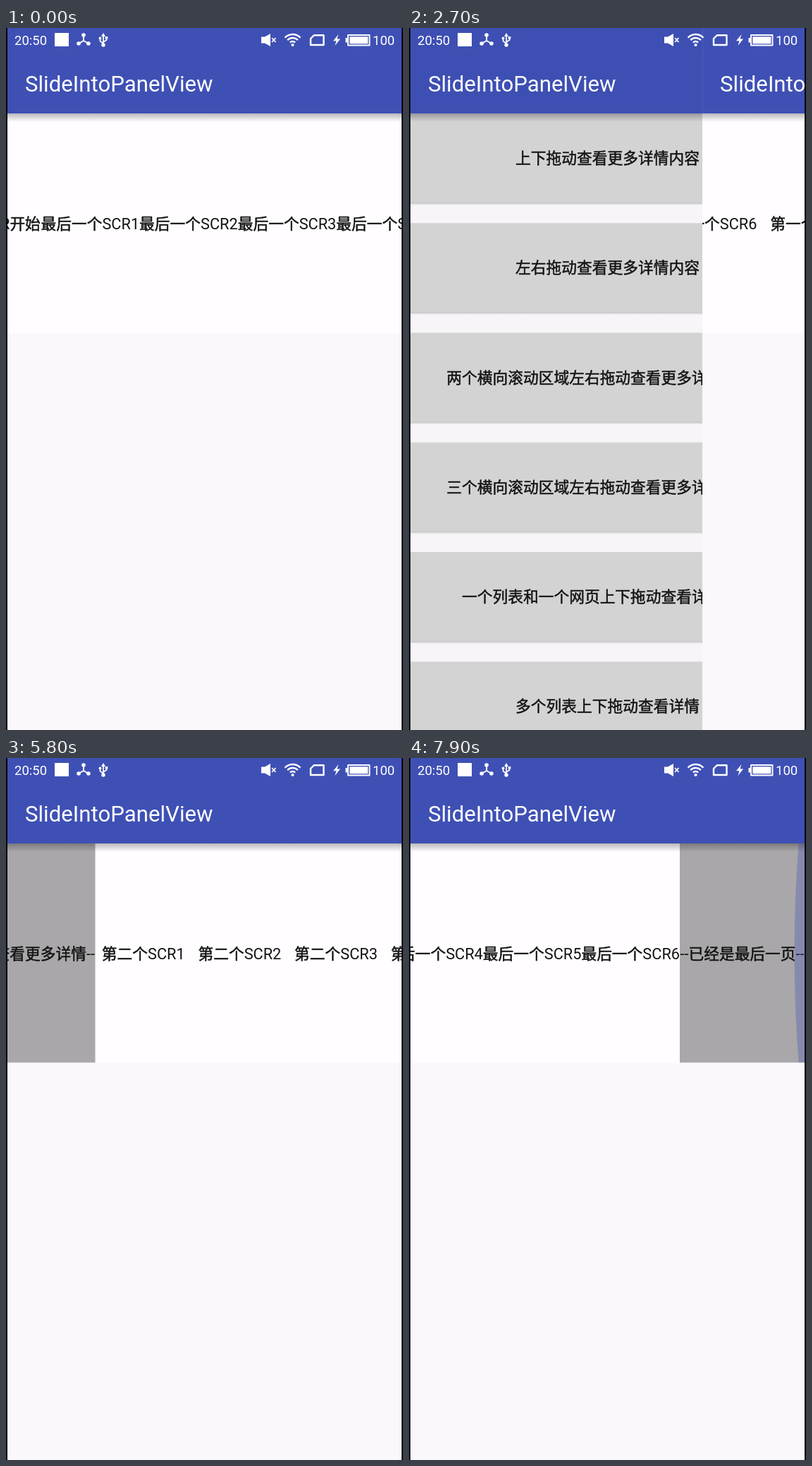
Animation, 563 px wide and 994 px high, one loop 8 s. Source, as an HTML page with a canvas:

```html
<!DOCTYPE html>
<html lang="zh-CN">
<head>
<meta charset="utf-8">
<style>
html, body { margin: 0; width: 100%; height: 100%; overflow: hidden; background: #000; }
canvas { display: block; }
</style>
</head>
<body>
<canvas id="stage" width="563" height="994"></canvas>
<script>
const ctx = document.getElementById('stage').getContext('2d');
const FONT = 'Roboto, "Noto Sans CJK SC", "Noto Sans CJK", sans-serif';
const BLUE = '#3f50b5', INK = '#141414', WHITE = '#fff';
const LOOP = 8000, STEP = 100, W = 559, H = 994, BAR = 121, STRIP = 310.6, SIZE = 21.74;

// Strip geometry: three sections, each closed by a grey panel
const ITEM = 136.6, PANEL = 199, LAST_PANEL = 177, LAST_ITEM = 139.6, LEAD = 171.5;
const SECOND = 8 * ITEM + PANEL, THIRD = 2 * SECOND;
const LAST = THIRD + LEAD + 6 * LAST_ITEM;
const END1 = SECOND - W, END2 = THIRD - W, END3 = LAST + LAST_PANEL - W;
const REOPEN = 3000;

// Each swipe eases on from where the previous one stopped; an edge that is hit glows
const swipes = [
  { from: -1, to: 300, x: THIRD, edge: 'left' },
  { from: 400, to: 1000, x: END2 },
  { from: 1000, to: 1300, x: SECOND, edge: 'left' },
  { from: 1400, to: 1800, x: END1 },
  { from: REOPEN - 1, to: REOPEN, x: 0 },
  { from: 4200, to: 4700, x: END1, edge: 'right' },
  { from: 5345, to: 6000, x: SECOND },
  { from: 6100, to: 6600, x: END2, edge: 'right' },
  { from: 6829, to: 7200, x: THIRD },
  { from: 7500, to: 7850, x: END3, edge: 'right' }
];

const progress = (t, from, to) => Math.min(1, Math.max(0, (t - from) / (to - from)));
const smooth = p => p * p * (3 - 2 * p);

function scrollAt(t) {
  return swipes.reduce((x, s) => x + (s.x - x) * smooth(progress(t, s.from, s.to)), THIRD + 124);
}

function pageAt(t) {
  return t < REOPEN
    ? W * smooth(progress(t, 2500, 2800))
    : W * (1 - progress(t, 3600, 3900)) ** 4.7;
}

function rect(color, x, y, w, h) {
  ctx.fillStyle = color;
  ctx.fillRect(x, y, w, h);
}

// Chinese runs get a thin outline to look heavier than the Latin ones
function text(str, x, y, size = SIZE, color = INK, centered = false) {
  ctx.font = `${size}px ${FONT}`;
  ctx.fillStyle = ctx.strokeStyle = color;
  ctx.lineWidth = 0.5;
  if (centered) x -= ctx.measureText(str).width / 2;
  for (const run of str.match(/[\u4e00-\u9fff]+|[^\u4e00-\u9fff]+/g)) {
    ctx.fillText(run, x, y);
    if (run >= '\u4e00') ctx.strokeText(run, x, y);
    x += ctx.measureText(run).width;
  }
}

function clipped(x, y, w, h, draw) {
  ctx.save();
  ctx.beginPath();
  ctx.rect(x, y, w, h);
  ctx.clip();
  draw();
  ctx.restore();
}

function fade(y, h, alpha) {
  const g = ctx.createLinearGradient(0, y, 0, y + h);
  g.addColorStop(0, `rgba(0,0,0,${alpha})`);
  g.addColorStop(1, 'rgba(0,0,0,0)');
  rect(g, 0, y, W, h);
}

function appBar() {
  rect(BLUE, 0, 0, W, BAR);
  fade(BAR, 12, 0.27);
  text('SlideIntoPanelView', 25, 90, 31.2, WHITE);
}

function panel(str, x, w) {
  rect('#a9a7a9', x, BAR, w, STRIP);
  text(str, x + w / 2, 285, SIZE, INK, true);
}

function strip(scroll) {
  ctx.save();
  ctx.translate(-scroll, 0);
  ['第一个', '第二个'].forEach((name, s) => {
    const x = s * SECOND;
    for (let i = 0; i < 8; i++) text(`${name}SCR${i + 1}`, x + i * ITEM + 9.3, 285);
    panel('--左拉查看更多详情--', x + 8 * ITEM, PANEL);
  });
  text('最后一个SCR开始', THIRD, 285);
  for (let i = 0; i < 6; i++) text(`最后一个SCR${i + 1}`, THIRD + LEAD + i * LAST_ITEM, 285);
  panel('--已经是最后一页--', LAST, LAST_PANEL);
  ctx.restore();
}

function glow({ to, edge }, t) {
  const depth = 16 * Math.sin(Math.PI * progress(t, to - 130, to + 370));
  if (!edge || depth < 0.1) return;
  ctx.save();
  if (edge === 'right') {
    ctx.translate(W, 0);
    ctx.scale(-1, 1);
  }
  ctx.fillStyle = `rgba(63,81,181,${depth * 0.023})`;
  ctx.beginPath();
  ctx.moveTo(0, BAR);
  ctx.lineTo(depth * 0.58, BAR);
  ctx.quadraticCurveTo(depth * 1.42, BAR + STRIP / 2, depth * 0.58, BAR + STRIP);
  ctx.lineTo(0, BAR + STRIP);
  ctx.fill();
  ctx.restore();
}

function detailPage(t) {
  rect('#faf8fb', 0, 0, W, H);
  rect('#fffdff', 0, BAR, W, STRIP);
  clipped(0, BAR, W, STRIP, () => {
    strip(scrollAt(t));
    swipes.forEach(s => glow(s, t));
  });
  appBar();
}

function menuPage(t, dim) {
  const rows = [
    '上下拖动查看更多详情内容', '左右拖动查看更多详情内容',
    '两个横向滚动区域左右拖动查看更多详情的页面', '三个横向滚动区域左右拖动查看更多详情的页面',
    '一个列表和一个网页上下拖动查看详情内容', '多个列表上下拖动查看详情'
  ];
  rect('#faf8fb', 0, 0, W, H);
  rows.forEach((row, i) => {
    const y = BAR + i * 155.25;
    rect('#d7d5d7', 0, y, W, 126);
    fade(y + 126, 4, 0.22);
    if (i === 3 && t > REOPEN) {
      clipped(0, y, W, 126, () => dot(270, y + 63, 252, 'rgba(100,120,100,0.06)'));
    }
    text(row, W / 2, y + 71, SIZE, INK, true);
  });
  appBar();
  rect(`rgba(0,0,0,${dim})`, 0, 0, W, H);
}

function dot(x, y, r, color = WHITE) {
  ctx.fillStyle = color;
  ctx.beginPath();
  ctx.arc(x, y, r, 0, 7);
  ctx.fill();
}

function line(path, width) {
  ctx.lineWidth = width;
  ctx.stroke(new Path2D(path));
}

function solid(path) {
  ctx.fill(new Path2D(path));
}

function statusBar() {
  text('20:50', 12, 24, 18.5, WHITE);
  text('100', 520, 24, 18.5, WHITE);
  ctx.lineJoin = 'round';
  rect(WHITE, 69, 7, 20, 19);

  // Linked nodes
  for (let i = 0; i < 3; i++) {
    const a = Math.PI * (i * 2 / 3 - 0.5);
    const x = 110 + 8 * Math.cos(a), y = 18 + 8 * Math.sin(a);
    line(`M110 18L${x} ${y}`, 2);
    dot(x, y, 2.8);
  }

  // USB
  line('M138 10v14M138 22l-4.5-3.5v-4M138 20l4.5-3v-4', 1.7);
  solid('M138 7l-3 5h6z');
  dot(138, 24, 2.7);
  dot(133.5, 14.5, 1.9);
  rect(WHITE, 140.7, 12, 3.6, 3.6);

  // Muted speaker
  solid('M362 12.5h5l8-4.5v18l-8-4.5h-5z');
  line('M377 14l5.5 6m0-6l-5.5 6', 1.7);

  // Wi-Fi
  ctx.lineWidth = 2.3;
  for (let r = 5; r <= 15; r += 5) {
    ctx.beginPath();
    ctx.arc(406.5, 24, r, -Math.PI * 0.76, -Math.PI * 0.24);
    ctx.stroke();
  }
  dot(406.5, 24, 2.1);

  // SIM card, bolt, battery
  line('M437 10.2h13.5V24H432v-9z', 2.4);
  solid('M471.5 9L464 18.3h4.5l-2 6.7 7.5-9.5h-4.5z');
  line('M485 10h30.5v14.5H485z', 1.9);
  rect(WHITE, 481.5, 14, 3, 6.5);
  rect(WHITE, 487.3, 12.3, 26, 10);
}

function draw(t) {
  const x = pageAt(t);
  rect('#000', 0, 0, 563, H);
  clipped(2, 0, W, H, () => {
    ctx.translate(2, 0);
    if (x > 0) menuPage(t, 0.045 * (1 - x / W));
    clipped(x, 0, W, H, () => {
      ctx.translate(x, 0);
      detailPage(t);
    });
  });
  statusBar();
}

// The picture advances ten times a second
const start = performance.now();
function tick() {
  const t = Math.max(0, performance.now() - start) % LOOP;
  draw(Math.floor(t / STEP) * STEP);
  requestAnimationFrame(tick);
}
tick();
</script>
</body>
</html>
```
